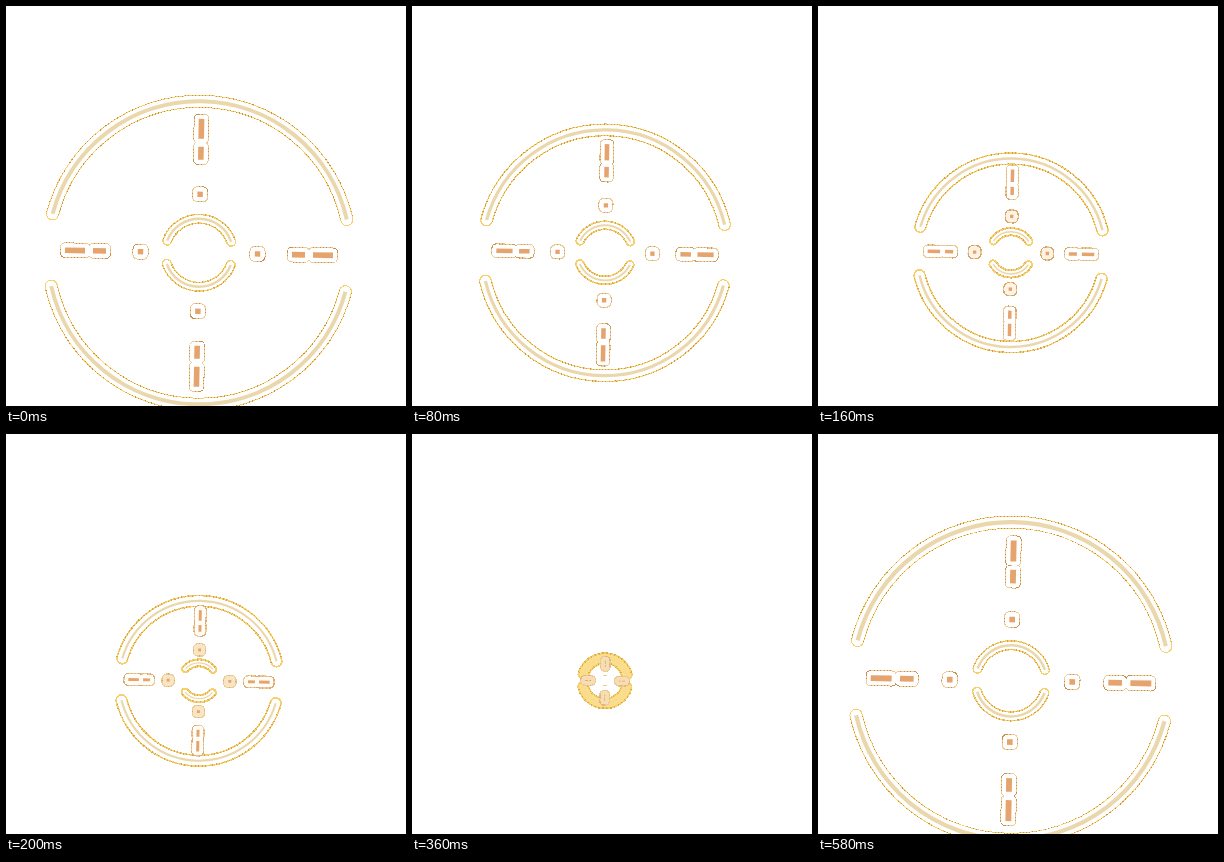
Write an HTML page that moves like this. It is 400 px wide and 400 px high and loops after 0.6 s.

```html
<!DOCTYPE html>
<html lang="en">
<head>
<meta charset="utf-8">
<title>Shrinking crosshair</title>
<style>
  html, body { margin: 0; width: 100%; height: 100%; overflow: hidden; background: #fff; }
  svg { display: block; width: 100%; height: 100%; }
</style>
</head>
<body>
<svg viewBox="0 0 400 400" shape-rendering="crispEdges">
  <g id="sight" transform="translate(193 246.8) rotate(1.1)" fill="none" stroke-linejoin="round"></g>
</svg>
<script>
const LOOP = 600, STEP = 20;
const START_RADIUS = 151.5, SPEED = 0.358;
const GOLD = '#f6d06c', TAN = '#eccb98', BROWN = '#bd7c34', ORANGE = '#e5a46d', CREAM = '#ead7ac';
const WHITE = [255, 255, 255], PEACH = [246, 222, 178], YELLOW = [252, 222, 138];
const sight = document.getElementById('sight');

const clamp = v => Math.max(0, Math.min(1, v));
const mix = (a, b, k) => `rgb(${a.map((v, i) => Math.round(v + (b[i] - v) * k))})`;
const point = (r, deg) => {
  const a = deg * Math.PI / 180;
  return `${(r * Math.cos(a)).toFixed(2)} ${(r * Math.sin(a)).toFixed(2)}`;
};
const arc = (r, from, to) => `M${point(r, from)}A${r} ${r} 0 0 1 ${point(r, to)}`;
const arcPair = (r, gap) => arc(r, 180 + gap, 360 - gap) + arc(r, gap, 180 - gap);
const box = (x1, x2, half) => `M${x1} ${-half}H${x2}V${half}H${x1}Z`;
const stroke = (d, width, color, extra = '') =>
  `<path d="${d}" stroke="${color}" stroke-width="${width}" ${extra}/>`;

// Speckled rim and halo, grown outwards from the core
function glow(d, core, reach, look, fill = '') {
  const outer = core + 2 * reach;
  return stroke(d, outer, look.color, `stroke-linecap="round" ${fill}`) +
    stroke(d, outer, BROWN, `stroke-dasharray="1 2.3" opacity="${look.speckle}"`) +
    stroke(d, outer - 2 * look.rim, look.halo, `stroke-linecap="round" ${fill}`);
}

function ring(d, core, reach, look) {
  return glow(d, core, reach, look) +
    stroke(d, core, CREAM, 'shape-rendering="auto"');
}

function block(d, angle, reach, look) {
  return `<g transform="rotate(${angle})">` +
    glow(d, 0, reach, look, `fill="${look.halo}"`) +
    `<path d="${d}" fill="${ORANGE}" shape-rendering="auto"/></g>`;
}

function innerRing(s, look) {
  const r = 34 * s;
  if (s < 0.25) return stroke(`M-2 ${-r}H2M-2 ${r}H2`, 1, GOLD);
  if (s > 0.42) {
    const gap = Math.asin(11.6 / r) * 180 / Math.PI;
    return ring(arcPair(r, gap), 2.4 * s, 3.9, look);
  }
  const d = [35, 125, 215, 305].map(a => arc(r, a, a + 20)).join('');
  return stroke(d, 6, GOLD) +
    stroke(d, 6, BROWN, `stroke-dasharray="1 2" opacity="${look.speckle}"`) +
    stroke(d, 2, ORANGE);
}

function draw(time) {
  const radius = START_RADIUS - SPEED * time;
  if (radius < -6) return '';
  if (radius < 1) return `<circle r="${radius + 6.2}" fill="${GOLD}"/>`;

  const s = radius / START_RADIUS;
  const near = clamp((1 - s) / 0.65);
  const rim = 1 + near * 0.9;
  const tint = (color, from) => mix(WHITE, color, clamp((from - s) / 0.22));
  const ringLook = { color: GOLD, rim, halo: tint(YELLOW, 0.4), speckle: 0.75 - near * 0.3 };
  const innerLook = { color: GOLD, rim: rim + 0.5, halo: '#fff', speckle: 0.55 - near * 0.2 };
  const armLook = { color: TAN, rim: 1 + near * 0.4, halo: tint(PEACH, 0.55), speckle: 0.75 - near * 0.5 };
  const dotLook = { ...armLook, halo: tint(PEACH, 0.7) };

  const arm = box(93 * s, 106 * s, 2.8 * s) + box(114 * s, 134 * s, 2.8 * s);
  const dot = box(55.8 * s, 61.2 * s, 2.7 * s);
  const blocks = (d, reach, look) =>
    [0, 90, 180, 270].map(a => block(d, a, reach, look)).join('');

  return ring(arcPair(radius, 13.8 + 3 * (1 - s)), 4 * s, 4.6 + (1 - s) * 1.2, ringLook) +
    innerRing(s, innerLook) +
    blocks(arm, 5.1, armLook) +
    (s > 0.25 ? blocks(dot, 5.4, dotLook) : '');
}

function tick(now) {
  const time = Math.floor((now % LOOP) / STEP) * STEP;
  // The last step already shows the sight at its largest
  sight.innerHTML = draw(time >= LOOP - STEP ? time - LOOP : time);
  requestAnimationFrame(tick);
}
tick(0);
</script>
</body>
</html>
```
